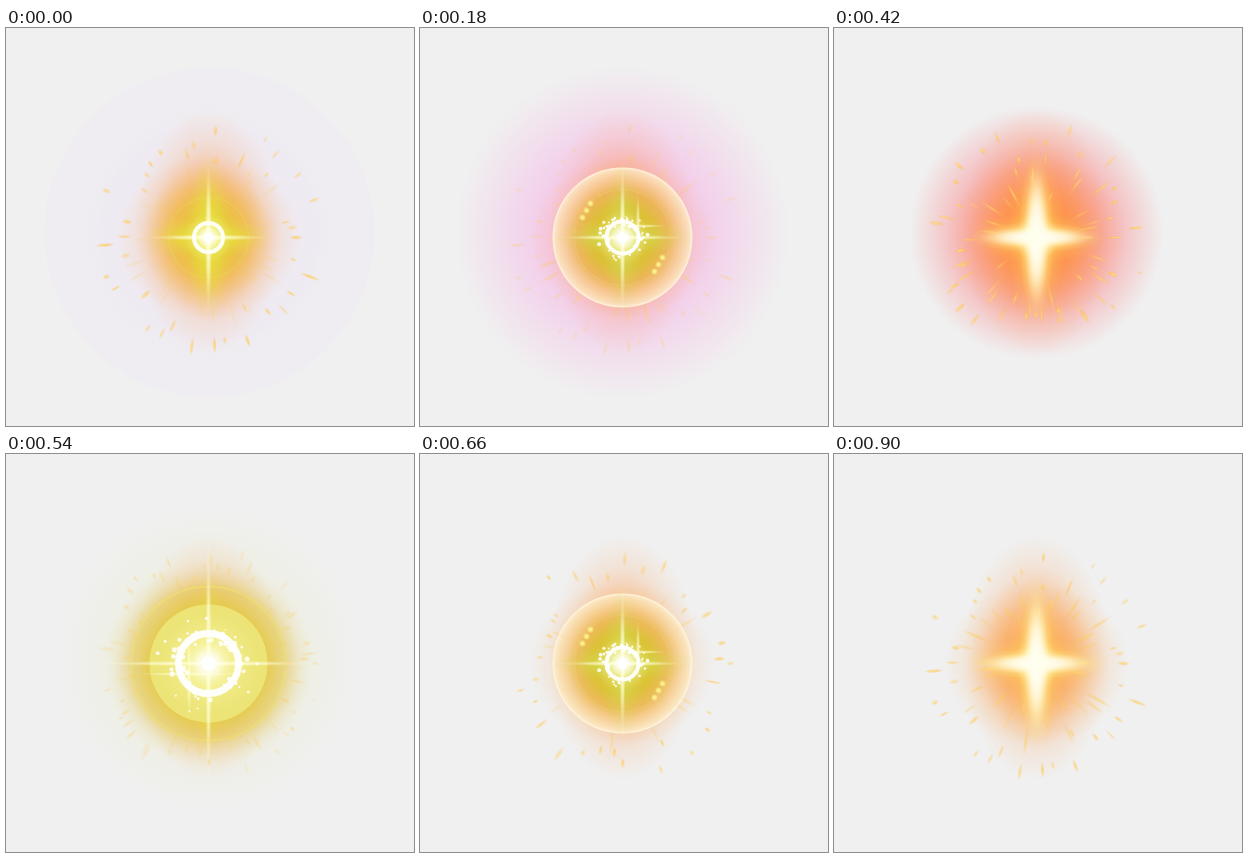
Animation of 408 by 398 pixels, one loop 0.96 s. Source, as an HTML page with a canvas:

```html
<!DOCTYPE html>
<html lang="en">
<head>
<meta charset="utf-8">
<title>Star burst</title>
<style>
html, body { margin: 0; width: 100%; height: 100%; overflow: hidden; background: #f0f0f0; }
canvas { display: block; }
</style>
</head>
<body>
<canvas id="stage" width="408" height="398"></canvas>
<script>
const ctx = document.getElementById('stage').getContext('2d');
const CX = 202.5, CY = 209.5, HALO_Y = 204.5;
const STEP = 60, STEPS = 16, CYCLE = 8, TAU = Math.PI * 2;
const WHITE = '255,255,255', CREAM = '255,255,215';

const haloKeys = [
  { step: 0, r: 165, rgb: [232, 215, 240], a: .07 },
  { step: 3, r: 167, rgb: [250, 140, 222], a: .56 },
  { step: 7, r: 127, rgb: [255, 90, 95], a: .78 },
  { step: 9, r: 152, rgb: [225, 230, 150], a: .3 },
  { step: 10, r: 150, rgb: [225, 230, 150], a: 0 }
];

const bursts = [
  { peak: 15.5, rise: 2.5, fall: 5, count: 38, seed: 71 },
  { peak: 7, rise: 3, fall: 3, count: 34, seed: 168 },
  { peak: 10.5, rise: 2.5, fall: 3.5, count: 32, seed: 265 }
];

const mix = (from, to, u) => from + (to - from) * u;

function seeded(seed) {
  return () => {
    seed = (seed * 16807) % 2147483647;
    return seed / 2147483647;
  };
}

function radial(x, y, rx, ry, stops) {
  const g = ctx.createRadialGradient(0, 0, 0, 0, 0, 1);
  for (const [at, rgb, a] of stops) g.addColorStop(at, `rgba(${rgb},${a})`);
  ctx.save();
  ctx.translate(x, y);
  ctx.scale(rx, ry);
  ctx.fillStyle = g;
  ctx.beginPath();
  ctx.arc(0, 0, 1, 0, TAU);
  ctx.fill();
  ctx.restore();
}

function soft(x, y, rx, ry, rgb, a) {
  radial(x, y, rx, ry, [[0, rgb, a], [.45, rgb, a * .65], [.75, rgb, a * .2], [1, rgb, 0]]);
}

function disc(x, y, r, rgb, a) {
  ctx.fillStyle = `rgba(${rgb},${a})`;
  ctx.beginPath();
  ctx.arc(x, y, r, 0, TAU);
  ctx.fill();
}

function ring(r, width, rgb, a) {
  ctx.strokeStyle = `rgba(${rgb},${a})`;
  ctx.lineWidth = width;
  ctx.beginPath();
  ctx.arc(CX, CY, r, 0, TAU);
  ctx.stroke();
}

function flare(x, y, w, h, width, rgb, a) {
  soft(x, y, w, width, rgb, a);
  soft(x, y, width * 1.15, h, rgb, a);
}

function halo(n) {
  const i = haloKeys.findIndex(key => key.step > n);
  if (i < 0) return;
  const from = haloKeys[i - 1], to = haloKeys[i];
  const u = (n - from.step) / (to.step - from.step);
  const r = mix(from.r, to.r, u), a = mix(from.a, to.a, u);
  const rgb = from.rgb.map((v, c) => Math.round(mix(v, to.rgb[c], u))).join();
  if (n === 0) {
    disc(CX + 1, HALO_Y, 165, '238,233,241', .45);
    disc(CX + 1, HALO_Y, 111, '238,230,243', .4);
  }
  radial(CX, HALO_Y, r, r, [[0, rgb, a], [.5, rgb, a * .6], [.8, rgb, a * .24], [1, rgb, 0]]);
}

function streak(angle, r, length, width, a) {
  ctx.save();
  ctx.translate(CX, CY);
  ctx.rotate(angle);
  soft(r, 0, length, width, '255,190,70', a);
  soft(r + length * .15, 0, length * .6, width * .6, '255,226,135', a);
  ctx.restore();
}

function sparks(n) {
  for (const { peak, rise, fall, count, seed } of bursts) {
    const age = (n - peak + STEPS * 1.5) % STEPS - STEPS / 2;
    const a = Math.max(0, 1 - Math.abs(age) / (age < 0 ? rise : fall));
    if (!a) continue;
    const rnd = seeded(seed);
    for (let i = 0; i < count; i++) {
      const angle = (i + rnd()) / count * TAU;
      const r = mix(74, 113, rnd()) * (1 + age * .007);
      streak(angle, r, mix(4, 12, rnd() ** 2), mix(1.6, 3, rnd()), a * mix(.4, .85, rnd()));
    }
  }
}

function innerRays(p, n) {
  const a = mix(.2, .65, p / 7);
  const rnd = seeded(n < CYCLE ? 313 : 571);
  for (let i = 0; i < 34; i++) {
    const angle = (i + rnd()) / 34 * TAU;
    streak(angle, mix(42, 82, rnd()), mix(8, 19, rnd()), 2.2, a * mix(.35, .85, rnd()));
  }
}

function speckles(count, r, spread, size, a) {
  const rnd = seeded(193);
  for (let i = 0; i < count; i++) {
    const angle = rnd() * TAU, d = r + (rnd() + rnd() - 1) * spread;
    disc(CX + Math.cos(angle) * d, CY + Math.sin(angle) * d, size * mix(.4, 1, rnd()), WHITE, a);
  }
}

function glow() {
  soft(CX, CY - 6, 74, 122, '255,145,55', .66);
  soft(CX, CY, 92, 82, '255,150,42', .62);
}

function bubble(a) {
  radial(CX, CY, 70, 70, [
    [0, '225,211,50', .88 * a], [.45, '213,198,45', .82 * a], [.66, '230,188,75', .66 * a],
    [.82, '247,213,148', .64 * a], [.95, '252,232,190', .78 * a], [1, '254,243,218', .84 * a]
  ]);
  ring(69, 1.5, '255,248,228', .35 * a);
  flare(CX, CY, 70, 76, 19, '208,222,85', .65 * a);
  ring(48, .8, '235,225,110', .3 * a);
  for (const side of [-1, 1]) {
    for (let i = -1; i <= 1; i++) {
      soft(CX + side * (36 + 4 * i), CY + side * (27 - 7 * i), 4, 4, '255,250,150', a);
    }
  }
}

function nucleus(r, width, dot, a) {
  soft(CX, CY, r * 1.7, r * 1.7, '255,255,190', .7 * a);
  ring(r, width, WHITE, .95 * a);
  soft(CX, CY, dot * 2, dot * 2, WHITE, a);
  disc(CX, CY, dot * .65, WHITE, a);
}

function whiteCross(a) {
  flare(CX, CY, 70, 88, 25, '255,216,95', .75 * a);
  flare(CX, CY, 66, 82, 15, '255,246,175', a);
  flare(CX, CY, 58, 70, 10.5, WHITE, a);
  soft(CX, CY, 22, 25, '255,255,235', .9 * a);
}

function opening() {
  soft(CX, CY, 64, 72, '226,208,45', .9);
  ring(40, 1, '232,215,90', .6);
  flare(CX, CY, 64, 84, 21, '228,230,60', .8);
  flare(CX, CY, 62, 77, 3.2, CREAM, 1);
  nucleus(14.5, 4, 7, 1);
}

function flash() {
  radial(CX, CY, 104, 104, [
    [0, '226,206,60', .85], [.55, '225,204,62', .8], [.72, '228,202,82', .6],
    [.88, '232,205,120', .2], [1, '235,215,150', 0]
  ]);
  soft(CX, CY, 16, 92, '235,226,50', .8);
  disc(CX, CY, 59, '237,230,122', .92);
  ring(77, 1.4, '238,226,105', .75);
  flare(CX, CY, 120, 132, 2.8, '255,255,225', 1);
  flare(183, 220, 54, 46, 2, CREAM, .85);
  nucleus(30, 7, 11, 1);
  speckles(80, 31, 10, 2.6, .85);
  speckles(12, 46, 12, 2, .85);
}

function fading(p) {
  const a = Math.min(1, (7 - p) / 4);
  const early = p === 2 ? 1 : 0;
  bubble(a);
  disc(CX, CY, 62, '238,230,110', .4 * early);
  whiteCross(Math.max(0, (p - 3) / 4));
  flare(CX, CY, 64, 77, 2.8, CREAM, a);
  flare(218, 198, 29, 32, 2, CREAM, .8 * a);
  nucleus(16 + 6 * early, 4 + early, 8, a);
  speckles(60, 19 + 7 * early, 8, 1.9, .9 * a);
}

function draw(n) {
  const p = n % CYCLE;
  ctx.fillStyle = '#f0f0f0';
  ctx.fillRect(0, 0, 408, 398);
  halo(n);
  glow();
  if (p !== 1) innerRays(p, n);
  if (p === 0) opening();
  else if (p === 1) flash();
  else fading(p);
  sparks(n);
}

const start = performance.now();
function tick() {
  draw(Math.floor((performance.now() - start) / STEP) % STEPS);
  requestAnimationFrame(tick);
}
tick();
</script>
</body>
</html>
```
